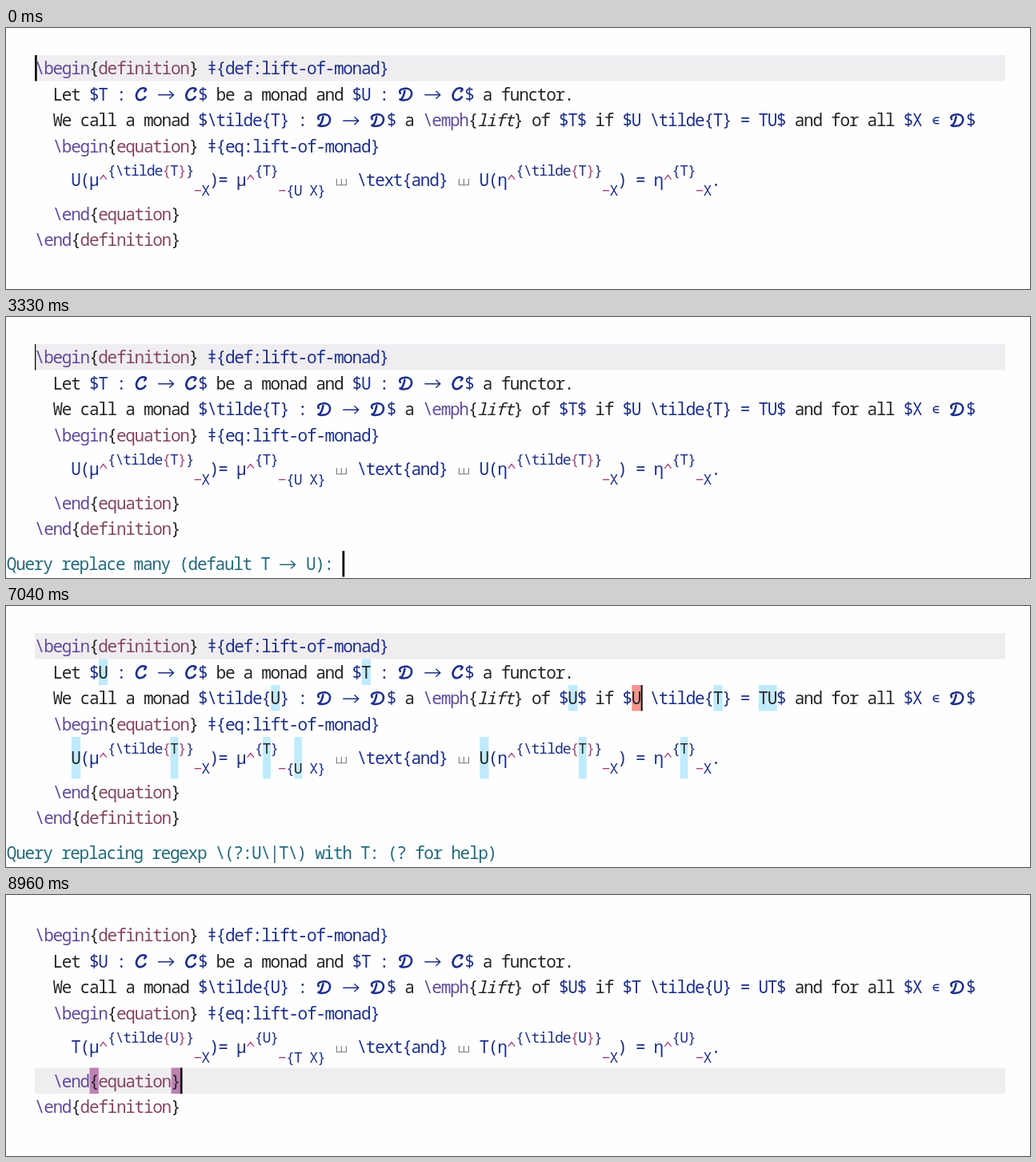
Write an HTML page that moves like this. It is 1280 px wide and 327 px high and loops after 9000 ms.

```html
<!DOCTYPE html>
<html lang="en">
<head>
<meta charset="utf-8">
<title>Query replace many</title>
<style>
  html, body { margin: 0; width: 100%; height: 100%; overflow: hidden; background: #fefefe; }
  svg { display: block; width: 1280px; height: 327px; }
  text { font-family: "Noto Sans Mono", "DejaVu Sans Mono", monospace; font-stretch: condensed;
         text-anchor: middle; white-space: pre; font-variant-ligatures: none; }
  .k { color: #242424; }
  .p { color: #614a9c; }
  .r { color: #854763; }
  .b { color: #1d2f8b; }
  .m { color: #ad437f; }
  .i { color: #242424; font-style: italic; }
  .q { color: #23697b; }
  text { fill: currentColor; }
  path { fill: none; stroke: currentColor; stroke-linecap: round; stroke-linejoin: round; }
</style>
</head>
<body>
<svg id="stage" viewBox="0 0 1280 327"></svg>
<script>
const stage = document.getElementById('stage');
const CELL = 11.335, SMALL = 9.8, LEFT = 36.5, SIZE = 21, LOOP = 9000;

// Each run: colour class, level (space, + raised, - lowered), text.
const ROWS = [
  String.raw`p \begin|k {|r definition|k } |b ǂ{def:lift-of-monad}`,
  String.raw`k   Let |b $T : 𝓒 → 𝓒$|k  be a monad and |b $U : 𝓓 → 𝓒$|k  a functor.`,
  String.raw`k   We call a monad |b $\tilde{T} : 𝓓 → 𝓓$|k  a |p \emph|k {|i lift|k } of |b $T$|k  if |b $U \tilde{T} = TU$|k  and for all |b $X ∈ 𝓓$`,
  String.raw`p   \begin|k {|r equation|k } |b ǂ{eq:lift-of-monad}`,
  String.raw`b     U(μ|m ^|b+{\tilde|m+{|b+T|m+}|b+}|m-−|b-X|b )= μ|m ^|b+{T}|m-−|b-{U X}|b  ш \text{and} ш U(η|m ^|b+{\tilde|m+{|b+T|m+}|b+}|m-−|b-X|b ) = η|m ^|b+{T}|m-−|b-X|b .`,
  String.raw`p   \end|k {|r equation|k }`,
  String.raw`p \end|k {|r definition|k }`
].map((source, i) => ({
  runs: source.split('|').map(run => ({ cls: run[0], level: run[1], text: run.slice(2) })),
  top: 34 + 32.5 * i + (i > 4 ? 20 : 0),
  height: i === 4 ? 52.5 : 32.5,
  base: i === 4 ? 34.3 : 24.3
}));

// Symbols: width in cells, stroke weight, outline from the baseline.
const SYMBOLS = {
  '𝓒': [1.5, 2.7, 'M12 -11.5Q16 -15 11 -15.5C5 -16 0 -8 2.5 -3C5 1.5 11 -1 13 -4.5'],
  '𝓓': [1.9, 2.6, 'M8.5 -12Q7 -4 4 -1.5M3 -9C0 -13 6 -15.5 11 -15C20 -14 19 -1.5 9 -.5Q4 0 2.5 -1.5'],
  '→': [2, 1.5, 'M1 -7h19m-5 -4.5l5 4.5l-5 4.5'],
  '∈': [1, 1.5, 'M9.5 -11h-3a3.7 3.7 0 0 0 0 7.4h3M3 -7.3h6'],
  '^': [1, 1.4, 'M2 -9l3.8 -5l3.8 5'],
  'ш': [1.5, 1.1, 'M2.5 -9v7.5h12v-7.5M8.5 -9v7.5']
};

const ASK = 'Query replace many ';
const query = to => String.raw`Query replacing regexp \(?:U\|T\) with ${to}: (? for help)`;
const reading = (prompt, typed = '') =>
  ({ line: 0, thin: true, prompt, typed, marks: typed && prompt.includes('default') ? typed : '' });
const asking = (current, to) =>
  ({ line: 0, done: current, current, marks: 'TU', prompt: query(to) });

const STEPS = [
  [0, { line: 0, home: true }],
  [1210, reading(ASK + '(default U → S): ')],
  [1750, reading(ASK + '(default U → S): ', 'T')],
  [2450, reading(ASK + 'T with: ')],
  [2750, reading(ASK + 'T with: ', 'U')],
  [3060, reading(ASK + '(default T → U): ')],
  [3420, reading(ASK + '(default T → U): ', 'U')],
  [3790, reading(ASK + 'U with: ')],
  [4150, reading(ASK + 'U with: ', 'T')],
  [4670, reading(ASK + '(default U → T): ')],
  [5180, asking(0, 'U')],
  [5700, asking(1, 'T')],
  [6120, asking(2, 'U')],
  [6540, asking(3, 'U')],
  [6960, asking(4, 'T')],
  [7500, { line: 4, done: 15, current: 14, marks: '', typed: 'Replaced 15 occurrences' }],
  [8420, { line: 5, done: 15, end: true }]
];

function add(tag, attrs, content) {
  const node = document.createElementNS('http://www.w3.org/2000/svg', tag);
  for (const key in attrs) node.setAttribute(key, attrs[key]);
  if (content) node.textContent = content;
  stage.append(node);
}
const box = (x, y, width, height, fill) => add('rect', { x, y, width, height, fill });
const bar = (x, row, width) => box(x, row.top, width, row.height, '#080808');

// Sets a piece of text on the cell grid and returns where it ends.
function put(text, x, y, cls, small) {
  const symbol = SYMBOLS[text];
  if (symbol) {
    add('path', { d: symbol[2], 'stroke-width': symbol[1], transform: `translate(${x} ${y})`,
                  class: text === 'ш' ? '' : cls, ...(text === 'ш' && { color: '#777' }) });
    return x + symbol[0] * CELL;
  }
  const cell = small ? SMALL : CELL;
  const chars = [...text];
  if (text.trim()) {
    add('text', { x: chars.map((c, i) => (x + (i + .5) * cell).toFixed(2)).join(' '), y, class: cls,
                  'font-size': SIZE * cell / CELL }, text);
  }
  return x + chars.length * cell;
}
const pieces = text => text.split(/([TU𝓒𝓓→∈ш])/u).filter(Boolean);

function draw(state) {
  stage.replaceChildren();
  const { done = 0, current = -1, marks = '' } = state;
  const active = ROWS[state.line];
  box(36, active.top, 1213, active.height, '#efedf0');
  if (state.end) {
    for (const column of [6, 15]) box(LEFT + column * CELL, active.top, CELL, active.height, '#bd82b3');
  }

  let match = 0, cursor;
  for (const row of ROWS) {
    let x = LEFT;
    for (const { cls, level, text } of row.runs) {
      const small = level !== ' ';
      const y = row.top + row.base + ({ '+': -13.3, '-': 11.7 }[level] || 0);
      for (let piece of pieces(text)) {
        let tone = cls;
        if (piece === 'T' || piece === 'U') {
          const width = small ? SMALL : CELL;
          if (match < done) piece = piece === 'T' ? 'U' : 'T';
          if (marks.includes(piece)) {
            box(x, row.top, width, row.height, match === current ? '#f5958e' : '#c0ebfd');
            tone = 'k';
          }
          if (match === current) cursor = [x + width, row];
          match++;
        }
        x = put(piece, x, y, tone, small);
      }
    }
  }

  if (cursor) bar(cursor[0], cursor[1], marks ? 2 : 2.6);
  if (state.home || state.thin) bar(36, ROWS[0], state.thin ? 1.3 : 2.7);
  if (state.end) bar(LEFT + 16 * CELL, active, 2.6);

  let x = 1.5;
  for (const piece of pieces(state.prompt || '')) x = put(piece, x, 317.3, 'q');
  if (state.typed) x = put(state.typed, x, 317.3, 'k');
  if (state.thin) box(x - .5, 293, 2.8, 32.5, '#080808');
}

let shown;
function tick() {
  const time = performance.now() % LOOP;
  const step = STEPS.findLast(([start]) => start <= time);
  if (step !== shown) draw((shown = step)[1]);
  requestAnimationFrame(tick);
}
tick();
</script>
</body>
</html>
```
